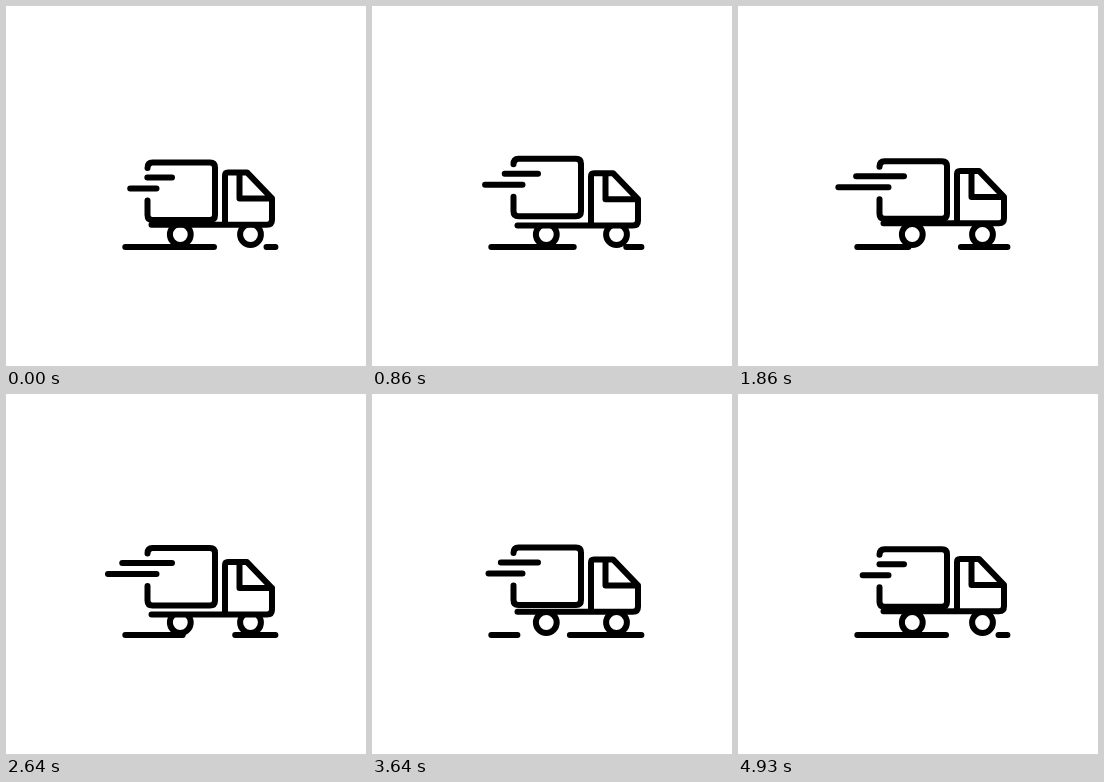
Recreate the animation shown at these times as an HTML page. Size 360 px wide and 360 px high, loop 5 s.

```html
<!DOCTYPE html>
<html lang="en">
<head>
<meta charset="utf-8">
<title>Delivery truck</title>
<style>
  html, body { margin: 0; width: 100%; height: 100%; overflow: hidden; background: #fff; }
  svg { display: block; width: 100%; height: 100%; }
  path, circle { fill: none; stroke: #000; stroke-width: 6; stroke-linecap: round; stroke-linejoin: round; }
  rect { fill: #fff; }
</style>
</head>
<body>
<svg viewBox="0 0 360 360">
  <path id="road"/>
  <circle cx="174.3" cy="228.5" r="10.4"/>
  <circle cx="244.5" cy="228.5" r="10.4"/>
  <g id="cab">
    <rect x="146" y="32" width="118" height="20"/>
    <path d="M145.5 52.4H261Q266 52.4 266 47.4V26L241 0H222Q219 0 219 3V52.4M233.5 0V26H266"/>
  </g>
  <g id="cargo">
    <path d="M141.5 5.5Q141.5 0 146.5 0H204Q209 0 209 5V52.5Q209 57.5 204 57.5H146.5Q141.5 57.5 141.5 52.5V38"/>
    <path id="streaks"/>
  </g>
</svg>
<script>
const LOOP = 5000, STEPS = 70;
const BOUNCE = 21.5;                      // steps per suspension bounce
const ROAD = { left: 119.3, right: 269.4, gap: 52.5, period: 144, cycle: 11.5 };

const part = id => document.getElementById(id);
const road = part('road'), cargo = part('cargo'), streaks = part('streaks'), cab = part('cab');

const wave = (step, peak, period) => Math.cos(2 * Math.PI * (step - peak) / period);
const shiftY = (el, y) => el.setAttribute('transform', `translate(0 ${y.toFixed(2)})`);

function roadPath(step) {
  const { left, right, gap, period, cycle } = ROAD;
  const first = 208 - period * (step / cycle % 1);
  let d = '';
  for (let i = -2; i < 2; i++) {
    const from = Math.max(left, first + i * period + gap);
    const to = Math.min(right, first + (i + 1) * period);
    if (from < to) d += `M${from} 241H${to}`;
  }
  return d;
}

function draw(now) {
  const step = Math.floor((now % LOOP + 5) * STEPS / LOOP) % STEPS;
  const upper = 128.5 + 13 * wave(step, 68.2, STEPS);
  const lower = 112.5 + 13 * wave(step, 65, STEPS);
  shiftY(cargo, 154.6 + 2 * wave(step, 0.4, BOUNCE));
  shiftY(cab, 166.5 + 1.6 * wave(step, 16, BOUNCE));
  streaks.setAttribute('d', `M${upper} 15H166M${lower} 26H150.5`);
  road.setAttribute('d', roadPath(step));
}

const start = performance.now();
function tick() {
  draw(performance.now() - start);
  requestAnimationFrame(tick);
}
tick();
</script>
</body>
</html>
```
